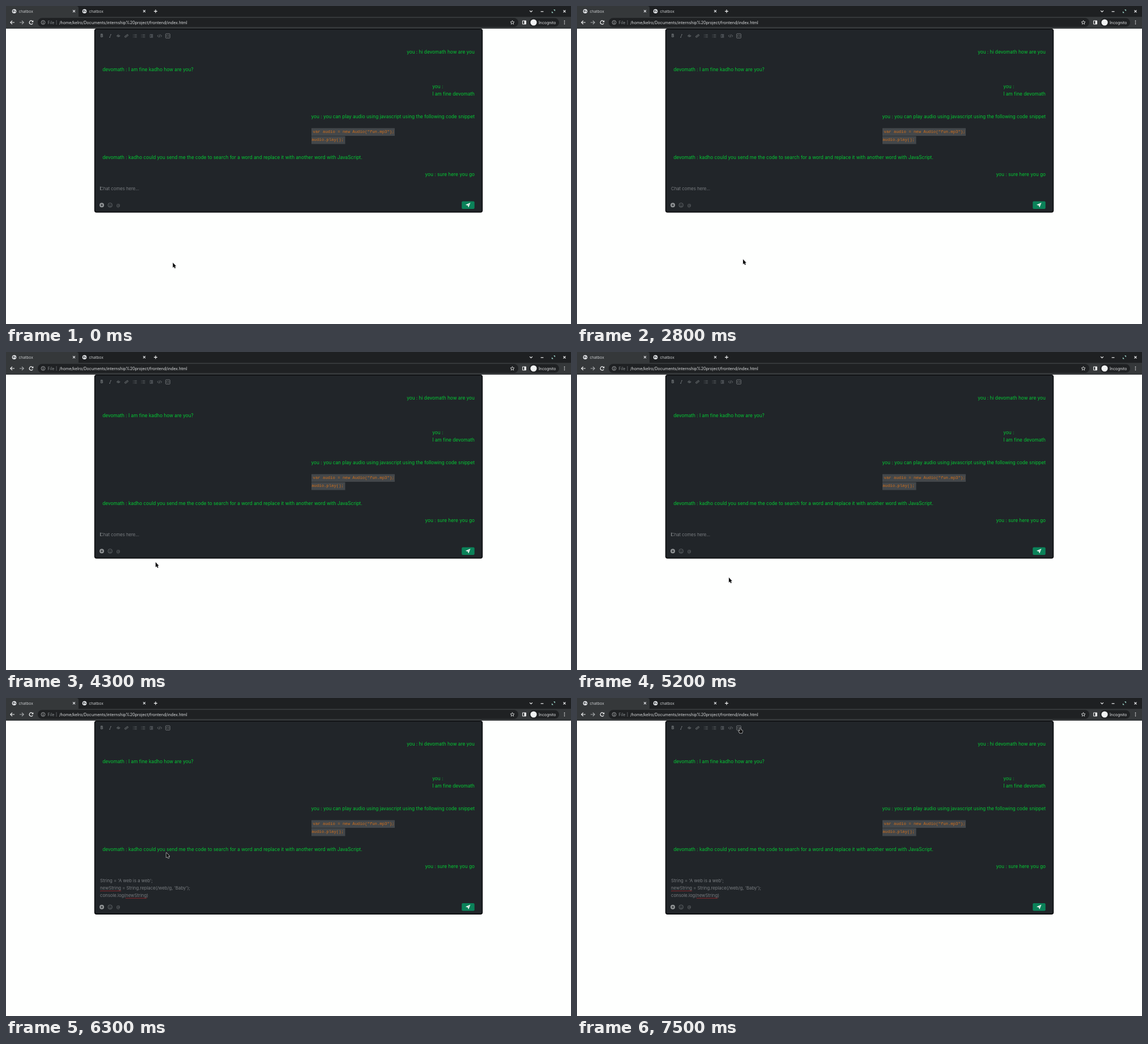
These frames come from a looping animation (997 by 561 pixels, 8 s). An HTML page with a canvas:

```html
<!DOCTYPE html>
<html lang="en">
<head>
<meta charset="utf-8">
<title>chatbox</title>
<style>
html, body { margin: 0; width: 100%; height: 100%; overflow: hidden; background: #fefffe; }
canvas { display: block; width: 997px; height: 561px; }
</style>
</head>
<body>
<canvas id="stage" width="997" height="561"></canvas>
<script>
const ctx = document.getElementById('stage').getContext('2d');
const LOOP = 8000, PASTE = 5700;
const SANS = 'Inter, sans-serif', MONO = '"Liberation Mono", monospace';
const GREEN = '#04c934', PANEL = '#212529', GREY = '#797d80', ICON = '#6d7174';

// Pointer tip: time, x, y
const PATH = [
  [2700, 294.5, 453], [2800, 293, 447], [3000, 279, 403], [3200, 265.5, 355.5],
  [3400, 259, 333], [3600, 258, 325], [4200, 258, 325], [4300, 264, 371],
  [4400, 268, 398], [5900, 268, 398], [6000, 268.5, 394], [6300, 283, 273],
  [6700, 301, 119], [6800, 294, 86], [7000, 290, 64], [7300, 288, 53]
];

// Times at which the caret turns on or off, starting visible
const BLINKS = [400, 1000, 1600, 2200, 2800, 3400, 4600, 5200, 6300, 6900, 7500];

function text(str, x, y, size, color, align = 'left', font = SANS, weight = 'normal') {
  ctx.font = `${weight} ${size}px ${font}`;
  ctx.textAlign = align;
  ctx.fillStyle = color;
  ctx.fillText(str, x, y);
}

function width(str, size) {
  ctx.font = `${size}px ${SANS}`;
  return ctx.measureText(str).width;
}

function rect(x, y, w, h, color, r = 0) {
  ctx.fillStyle = color;
  ctx.beginPath();
  ctx.roundRect(x, y, w, h, r);
  ctx.fill();
}

function disc(x, y, r, color) {
  ctx.fillStyle = color;
  ctx.beginPath();
  ctx.arc(x, y, r, 0, 7);
  ctx.fill();
}

function ring(x, y, r, color, w = 0.8, from = 0, to = 2 * Math.PI) {
  ctx.strokeStyle = color;
  ctx.lineWidth = w;
  ctx.beginPath();
  ctx.arc(x, y, r, from, to);
  ctx.stroke();
}

// Strokes an SVG path placed at x, y
function icon(d, x, y, color, w = 0.9) {
  ctx.save();
  ctx.translate(x, y);
  ctx.strokeStyle = color;
  ctx.lineWidth = w;
  ctx.stroke(new Path2D(d));
  ctx.restore();
}

// Fills an SVG path placed at x, y, with an optional outline
function shape(d, x, y, fill, edge) {
  const p = new Path2D(d);
  ctx.save();
  ctx.translate(x, y);
  ctx.lineJoin = 'round';
  if (edge) {
    ctx.strokeStyle = edge;
    ctx.lineWidth = 1.2;
    ctx.stroke(p);
  }
  ctx.fillStyle = fill;
  ctx.fill(p);
  ctx.restore();
}

function tab(x) {
  disc(x + 14.5, 9.3, 3.8, '#e8eaed');
  shape('M-2.6 -1.8L0 -2L.6 -.4L-1 .4L-.6 2.6L-2.4 .8Z M1.4 -1.6L2.8 -.4L2 1.6L.8 .6Z', x + 14.5, 9.3, '#55585b');
  text('chatbox', x + 22.5, 11.7, 6.7, '#c8cacc');
  icon('M-2 -2L2 2M2 -2L-2 2', x + 120, 9.2, '#e8eaed', 1.1);
}

function browser() {
  rect(0, 0, 997, 20, '#1e2022');
  rect(0, 0, 128, 20, '#35383a', [0, 4, 0, 0]);
  rect(0, 19, 997, 21, '#35383a');
  rect(56, 21, 848, 16, '#1f2123', 8);
  tab(0);
  tab(124);

  const white = '#f0f1f2';
  icon('M-3 0H3M0 -3V3', 264, 9.3, white, 1.2);
  icon('M-2.4 -1.2L0 1.2L2.4 -1.2', 926.5, 9.3, white, 1.2);
  icon('M-2.4 0H2.4', 946, 9.8, white, 1.2);
  shape('M0 -3H3V0Z M0 3H-3V0Z', 966, 9.3, '#9fd8cc');
  icon('M-2 -2L2 2M2 -2L-2 2', 985.5, 9.3, white, 1.2);

  icon('M4 0H-3M0 -3.2L-3.2 0L0 3.2', 11, 29, white, 1.2);
  icon('M-4 0H3M0 -3.2L3.2 0L0 3.2', 28, 29, '#a5a8aa', 1.2);
  ring(44.5, 29, 3.2, white, 1.2, 0.5, 5.5);
  shape('M3.8 -3.8V-.4H.4Z', 44.5, 29, white);

  ring(65.5, 29, 3.4, '#c2c5c7');
  icon('M0 -1.9V-.9M0 -.2V2', 65.5, 29, '#c2c5c7', 1);
  text('File', 73.5, 31.5, 7.15, '#8c9093');
  rect(88.6, 25, 0.8, 8, '#6a6e71');
  text('/home/kelro/Documents/internship%20project/frontend/index.html', 94, 31.5, 7.15, '#d9dbdd');

  icon('M0 -3.4L1 -1.1L3.5 -.9L1.6 .7L2.2 3.1L0 1.8L-2.2 3.1L-1.6 .7L-3.5 -.9L-1 -1.1Z', 893.5, 29, white, 0.8);
  icon('M-3 -3H3V3H-3Z', 914.5, 29, white, 1);
  rect(914.5, 26, 3, 6, white);
  rect(923, 21.5, 53, 15, '#1f2123', 7.5);
  disc(931, 29, 5.6, '#f1f3f4');
  text('Incognito', 940, 31.5, 6.9, '#e3e5e7');
  for (const dy of [-2.6, 0, 2.6]) disc(985.5, 29 + dy, 0.8, white);
}

function formatBar() {
  const y = 52.8;
  text('B', 169, y + 2.5, 7, '#7c8083', 'center', SANS, 'bold');
  icon('M1 -2.5L-1 2.5M0 -2.5H2M-2 2.5H0', 184, y, ICON);
  text('S', 198.3, y + 2.4, 6.8, ICON, 'center');
  icon('M-3.2 0H3.2', 198.3, y, '#85898b', 0.8);
  icon('M-.4 -1L1 -2.4Q2.2 -3 2.8 -1.8Q3.2 -1 2.2 0L1 1.1M.4 1L-1 2.4Q-2.2 3 -2.8 1.8Q-3.2 1 -2.2 0L-1 -1.1M-1 1L1 -1', 212.5, y, '#7c8083');
  for (const x of [227.5, 242]) {
    icon('M-3.4 -2.3H-2.4M-3.4 0H-2.4M-3.4 2.3H-2.4M-1.2 -2.3H3.4M-1.2 0H3.4M-1.2 2.3H3.4', x, y, '#585d60');
  }
  icon('M-2.8 -2.5H2.8M-.8 -.8H2.8M-.8 .8H2.8M-2.8 2.5H2.8M-2.4 -1V1', 256.5, y, ICON);
  icon('M-1.8 -2L-3.8 0L-1.8 2M1.8 -2L3.8 0L1.8 2M.8 -2.6L-.8 2.6', 271, y, ICON);
  icon('M-3 -3.8H3Q3.8 -3.8 3.8 -3V3Q3.8 3.8 3 3.8H-3Q-3.8 3.8 -3.8 3V-3Q-3.8 -3.8 -3 -3.8ZM-.8 -1.6L-2.2 0L-.8 1.6M.8 -1.6L2.2 0L.8 1.6', 285.5, y, '#83878a', 0.8);
}

function messages() {
  const size = 8.3, right = 827, left = 170.2;
  const say = (str, x, y, align) => text(str, x, y, size, GREEN, align);
  const reply = 'I am fine devomath';
  const replyX = right - width(reply, size);

  say('you : hi devomath how are you', right, 84.4, 'right');
  say('devomath : I am fine kadho how are you?', left, 114.8);
  say('you :', replyX, 145.4);
  say(reply, replyX, 158.3);
  say('you : you can play audio using javascript using the following code snippet', right, 197.8, 'right');

  rect(539, 215.5, 147, 13.5, '#43474a');
  rect(539, 229.8, 59.5, 13.6, '#43474a');
  text('var audio = new Audio("fun.mp3");', 541.6, 224.3, 7.27, '#d4711c', 'left', MONO);
  text('audio.play();', 539.2, 238.4, 7.27, '#d4711c', 'left', MONO);

  say('devomath : kadho could you send me the code to search for a word and replace it with another word with JavaScript.', left, 269.6);
  say('you : sure here you go', right, 300, 'right');
}

function squiggle(x, w, y) {
  ctx.strokeStyle = '#b3262b';
  ctx.lineWidth = 0.9;
  ctx.beginPath();
  for (let i = 0; i <= w; i += 0.5) ctx.lineTo(x + i, y + 0.45 * Math.sin(i * 2.4));
  ctx.stroke();
}

function editor(t) {
  const x = 166, size = 7.75, caret = '#999c9e';
  const caretOn = BLINKS.filter(b => b <= t).length % 2 === 0;
  if (t >= PASTE) {
    const log = 'console.log(';
    text("String = 'A web is a web';", x, 325, size, GREY);
    text("newString = String.replace(/web/g, 'Baby');", x, 338.1, size, GREY);
    text(log + 'newString)', x, 351.2, size, GREY);
    const word = width('newString', size);
    squiggle(x, word, 340.3);
    squiggle(x + width(log, size), word, 353.2);
    if (caretOn) rect(249.8, 345.5, 0.8, 7.5, caret);
  } else {
    text('Chat comes here...', x, 325, size, GREY);
    if (caretOn) rect(166, 318.5, 0.8, 6.5, caret);
  }
}

function actions(y) {
  disc(169, y, 4, '#929597');
  icon('M-2 0H2M0 -2V2', 169, y, PANEL, 1);
  ring(183.7, y, 3.8, ICON);
  disc(182.4, y - 1, 0.6, ICON);
  disc(185, y - 1, 0.6, ICON);
  ring(183.7, y + 0.2, 1.9, ICON, 0.8, 0.2, 2.9);
  text('@', 198.2, y + 2.4, 7, ICON, 'center');
  rect(804.2, y - 6.7, 22.5, 13.5, '#0b8259', 2);
  shape('M4.2 -4.2L.9 4.2L-.6 .8L-4.4 -.6Z', 815.3, y, '#f4faf7');
  icon('M-.6 .8L2 -2', 815.3, y, '#0b8259', 0.5);
}

function pointAt(t) {
  if (t <= PATH[0][0]) return PATH[0].slice(1);
  for (let i = 1; i < PATH.length; i++) {
    const [t0, x0, y0] = PATH[i - 1], [t1, x1, y1] = PATH[i];
    if (t <= t1) {
      const k = (t - t0) / (t1 - t0);
      return [x0 + (x1 - x0) * k, y0 + (y1 - y0) * k];
    }
  }
  return PATH[PATH.length - 1].slice(1);
}

function pointer(t) {
  const [x, y] = pointAt(t);
  const inputEnd = t >= PASTE ? 354 : 336;
  if (y > 316 && y < inputEnd) {
    icon('M-1.8 -4.5H1.8M0 -4.5V4.5M-1.8 4.5H1.8', x, y, '#d5d7d8');
  } else if (y < 58) {
    shape('M-.8 .6Q0 -.4 .8 .6V3.2L3.6 4Q4.4 4.4 4.2 5.6L3.4 8.8H-.8L-3 5.6Q-2.8 4.4 -1.8 5L-.8 5.8Z', x, y, '#111', '#d8dadb');
  } else {
    shape('M0 0V8.4L1.9 6.7L3.2 9.7L4.7 9L3.4 6.1H5.6Z', x, y, '#0a0a0a', '#d8dadb');
  }
}

function draw(now) {
  const t = Math.floor(now % LOOP / 100) * 100;
  const grow = t >= PASTE ? 17.5 : 0;
  ctx.fillStyle = '#fefffe';
  ctx.fillRect(0, 0, 997, 561);
  browser();
  rect(155.8, 40, 685.4, 324.5 + grow, '#0c0e10', 4);
  rect(157.3, 41.5, 682.4, 321.3 + grow, PANEL, 3);
  formatBar();
  messages();
  editor(t);
  actions(351.3 + grow);
  pointer(t);
}

let start;
function tick(now) {
  start ??= now;
  draw(now - start);
  requestAnimationFrame(tick);
}
draw(0);
requestAnimationFrame(tick);
</script>
</body>
</html>
```
